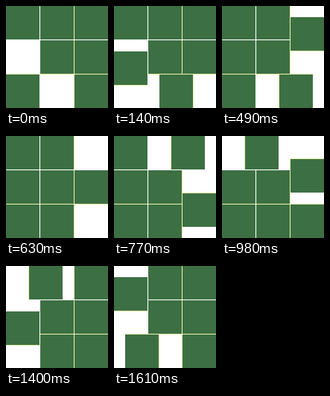
Recreate the animation shown at these times as an HTML page with a canvas. Size 128 by 128 pixels, loop 1680 ms.

```html
<!DOCTYPE html>
<html lang="en">
<head>
<meta charset="utf-8">
<title>Sliding tiles</title>
<style>
  html, body { margin: 0; width: 100%; height: 100%; overflow: hidden; background: #fff; }
  canvas { display: block; width: 128px; height: 128px; }
</style>
</head>
<body>
<canvas id="stage" width="128" height="128"></canvas>
<script>
const ctx = document.getElementById('stage').getContext('2d');
const GREEN = '#3c7043', FRINGE = '#e2eda6';
const SIZE = 42, PITCH = 43, STEP = 70, SUBSTEPS = 3;

// Cells are numbered 0 to 8 by row; each phase slides two tiles [from, to].
const PHASES = [
  [[6, 3], [8, 7]],
  [[7, 6], [5, 8]],
  [[2, 5], [8, 7]],
  [[1, 2], [5, 8]],
  [[0, 1], [2, 5]],
  [[3, 0], [1, 2]],
  [[6, 3], [0, 1]],
  [[3, 0], [7, 6]]
];
const LOOP = PHASES.length * SUBSTEPS * STEP;

const cellAt = i => [i % 3 * PITCH, Math.floor(i / 3) * PITCH];
const mix = (a, b, k) => Math.round(a + (b - a) * k);

function tilesAt(step) {
  const moves = PHASES[Math.floor(step / SUBSTEPS)];
  const k = step % SUBSTEPS / SUBSTEPS;
  const busy = moves.flat();
  const tiles = [];
  for (let i = 0; i < 9; i++) if (!busy.includes(i)) tiles.push(cellAt(i));
  for (const [from, to] of moves) {
    const a = cellAt(from), b = cellAt(to);
    tiles.push([mix(a[0], b[0], k), mix(a[1], b[1], k)]);
  }
  return tiles;
}

// Offset of the soft edge along one axis: before or after the tile.
function edge(p) {
  if (p === 0) return null;
  return p === 29 || p === 72 || p === 86 ? p - 1 : p + SIZE;
}

function draw(step) {
  const tiles = tilesAt(step);
  ctx.fillStyle = '#fff';
  ctx.fillRect(0, 0, 128, 128);
  ctx.fillStyle = FRINGE;
  for (const [x, y] of tiles) {
    const ex = edge(x), ey = edge(y);
    if (ex !== null) ctx.fillRect(ex, y, 1, SIZE);
    if (ey !== null) ctx.fillRect(x, ey, SIZE, 1);
  }
  ctx.fillStyle = GREEN;
  for (const [x, y] of tiles) ctx.fillRect(x, y, SIZE, SIZE);
}

const start = performance.now();
function tick() {
  draw(Math.floor((performance.now() - start) % LOOP / STEP));
  requestAnimationFrame(tick);
}
tick();
</script>
</body>
</html>
```
